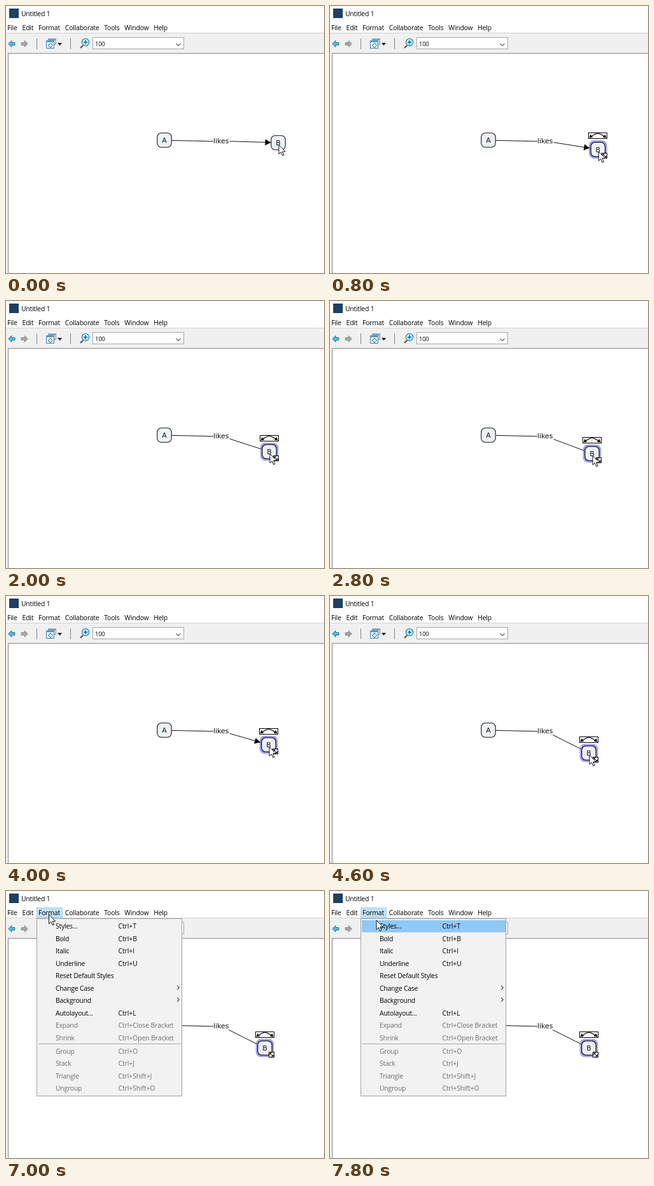
An HTML page with a canvas for the animation above (8 s loop, 500 by 420 pixels).

```html
<!DOCTYPE html>
<html lang="en">
<head>
<meta charset="utf-8">
<title>Concept map editor</title>
<style>
html, body { margin: 0; width: 100%; height: 100%; overflow: hidden; background: #fff; }
canvas { display: block; width: 500px; height: 420px; }
</style>
</head>
<body>
<canvas id="stage" width="500" height="420"></canvas>
<script>
const ctx = document.getElementById('stage').getContext('2d');
const LOOP = 8000, STEP = 200;
const UI = '"Open Sans", "Noto Sans", sans-serif';
const MAP = '"DejaVu Sans", sans-serif';
const A = { x: 249, y: 211 }, LABEL = { x: 338.2, y: 212.4 };
const FLAT_LIMIT = 237; // below this height the link has no arrowhead
const RELEASE = 5400;   // the pointer lets go of the node
const HOVER = 6600, OPEN = 7000;

const drag = [
  { from: 0, to: 1200, x: 418, y: 231 },
  { from: 1200, to: 2400, x: 412, y: 240 },
  { from: 2800, to: 3000, x: 413.5, y: 243 },
  { from: 3200, to: 4000, x: 413, y: 234 },
  { from: 4000, to: 4600, x: 407, y: 247 }
];
const leave = [
  { from: RELEASE, to: 6000, x: 150, y: 171 },
  { from: 6000, to: HOVER, x: 67.5, y: 37 },
  { from: OPEN, to: 7600, x: 73, y: 46 }
];

const menuItems = [
  ['Styles...', 'Ctrl+T'], ['Bold', 'Ctrl+B'], ['Italic', 'Ctrl+I'], ['Underline', 'Ctrl+U'],
  ['Reset Default Styles'], ['Change Case', '>'], ['Background', '>'], ['Autolayout...', 'Ctrl+L'],
  ['Expand', 'Ctrl+Close Bracket'], ['Shrink', 'Ctrl+Open Bracket'], ['Group', 'Ctrl+O'],
  ['Stack', 'Ctrl+J'], ['Triangle', 'Ctrl+Shift+J'], ['Ungroup', 'Ctrl+Shift+O']
];

// Run through straight moves, resting between them
function follow(start, moves, t) {
  return moves.reduce((p, m) => {
    const f = Math.min(1, Math.max(0, (t - m.from) / (m.to - m.from)));
    return { x: p.x + (m.x - p.x) * f, y: p.y + (m.y - p.y) * f };
  }, start);
}

const nodeAt = t => follow({ x: 428, y: 215 }, drag, t);

function pointerAt(t) {
  const b = nodeAt(t);
  return follow({ x: b.x + 1, y: b.y + 3.4 }, leave, t);
}

function rect(x, y, w, h, fill, stroke) {
  if (fill) { ctx.fillStyle = fill; ctx.fillRect(x, y, w, h); }
  if (stroke) {
    ctx.strokeStyle = stroke; ctx.lineWidth = 1;
    ctx.strokeRect(x + 0.5, y + 0.5, w - 1, h - 1);
  }
}

function path(points, { fill, stroke, width = 1 }) {
  ctx.beginPath();
  points.forEach(([x, y]) => ctx.lineTo(x, y));
  if (fill) { ctx.closePath(); ctx.fillStyle = fill; ctx.fill(); }
  if (stroke) { ctx.strokeStyle = stroke; ctx.lineWidth = width; ctx.stroke(); }
}

function shifted(x, y, draw, angle = 0, flip = 1) {
  ctx.save();
  ctx.translate(x, y);
  ctx.rotate(angle);
  ctx.scale(flip, 1);
  draw();
  ctx.restore();
}

// Arrowhead with its tip at x, y
function head(x, y, angle, length, half) {
  shifted(x, y, () => path([[0, 0], [-length, -half], [-length, half]], { fill: '#000' }), angle);
}

// Small v mark, turned by the angle
function chevron(x, y, size, angle) {
  shifted(x, y, () => path([[-size, -size / 2], [0, size / 2], [size, -size / 2]],
    { stroke: '#444', width: 1.1 }), angle);
}

// Returns the width of the text
function text(s, x, y, color = '#000', size = 10.4, spacing = -0.2) {
  ctx.font = `${size}px ${UI}`;
  ctx.letterSpacing = spacing + 'px';
  ctx.textAlign = 'left';
  ctx.fillStyle = color;
  ctx.fillText(s, x, y);
  return ctx.measureText(s).width;
}

function mapText(s, { x, y }) {
  ctx.font = `11px ${MAP}`;
  ctx.letterSpacing = '0px';
  ctx.textAlign = 'center';
  ctx.fillStyle = '#111';
  ctx.fillText(s, x, y + 4);
}

function navArrow(x, dir, fill, stroke) {
  shifted(x, 59.5, () => path(
    [[-5, 0], [0, -5], [0, -2], [5, -2], [5, 2], [0, 2], [0, 5]], { fill, stroke }), 0, dir);
}

function windowsIcon(x, y) {
  rect(x + 3, y, 13, 10, '#ead9c5', '#a58c78');
  rect(x + 3, y, 13, 3, '#7fa3c2');
  rect(x, y + 3, 13, 13, '#eaf5fc', '#4b80a8');
  rect(x, y + 3, 13, 3, '#5b97c2');
  shifted(x + 7, y + 11, () => rect(-3, -3, 6, 6, '#fff', '#2b86c0'), Math.PI / 4);
}

function zoomIcon(x, y) {
  path([[x - 4, y + 5], [x - 8, y + 9]], { stroke: '#6b5348', width: 2.4 });
  ctx.beginPath();
  ctx.arc(x, y, 5.6, 0, 7);
  ctx.fillStyle = '#c9ecfa'; ctx.fill();
  ctx.strokeStyle = '#2587bd'; ctx.lineWidth = 1.3; ctx.stroke();
  path([[x - 3, y], [x + 3, y]], { stroke: '#146fa6', width: 1.6 });
  path([[x, y - 3], [x, y + 3]], { stroke: '#146fa6', width: 1.6 });
}

function toolbar() {
  rect(0, 42, 500, 33, '#f0f0f0');
  rect(0, 42, 500, 1, '#d2d2d2');
  navArrow(8.8, 1, '#55bfe0', '#1b6f9c');
  navArrow(29.2, -1, '#a6a6a6', '#8c8c8c');
  for (const x of [48, 101]) rect(x, 51, 1, 17, '#858585');
  windowsIcon(63, 51);
  head(84.5, 62, Math.PI / 2, 4, 3.5);
  zoomIcon(125, 57);
  rect(136, 49, 144, 19, '#fff', '#a6a6a6');
  text('100', 140, 63, '#000', 9.4);
  chevron(271, 60.8, 3.5, 0);
}

function windowFrame(hover) {
  rect(0, 0, 500, 420, '#fff');
  rect(5, 4, 15, 15, '#1f3f63');
  text('Untitled 1', 24, 16);
  if (hover) rect(48, 26, 41, 16, '#c3e2f6', '#a2d0f0');
  let x = 2;
  for (const name of ['File', 'Edit', 'Format', 'Collaborate', 'Tools', 'Window', 'Help']) {
    x += text(name, x, 38) + 7.9;
  }
  toolbar();
  rect(0, 75, 3, 345, '#f0f0f0');
  rect(3, 74, 497, 1, '#8a8a8a');
  rect(3, 74, 1, 346, '#8a8a8a');
}

function node(p, name, selected) {
  const box = (r, corner, fill) => {
    ctx.beginPath();
    ctx.roundRect(p.x - r, p.y - r, 2 * r, 2 * r, corner);
    ctx.fillStyle = fill; ctx.fill();
  };
  if (selected) box(14.3, 8, '#a0a0f0');
  box(11.2, 6.5, selected ? '#eef1f8' : '#edf2f4');
  ctx.strokeStyle = '#161616';
  ctx.lineWidth = selected ? 1.3 : 1.1;
  ctx.stroke();
  mapText(name, p);
}

// Point where a ray from the centre of a box leaves it
function edge(from, to, halfW, halfH) {
  const dx = to.x - from.x, dy = to.y - from.y;
  const f = Math.min(halfW / Math.abs(dx), halfH / Math.abs(dy));
  return [from.x + dx * f, from.y + dy * f];
}

function link(b, selected) {
  path([[261, 211.4], [326, 212.9]], { stroke: '#111' });
  mapText('likes', LABEL);
  const r = selected ? 13 : 11.5;
  const tip = edge(b, LABEL, r, r);
  path([edge(LABEL, b, 13.5, 6), tip], { stroke: '#111' });
  if (b.y < FLAT_LIMIT) head(...tip, Math.atan2(b.y - LABEL.y, b.x - LABEL.x), 9, 4.8);
}

function handles(b) {
  const x = Math.floor(b.x), y = Math.floor(b.y);
  rect(x - 15, y - 26, 30, 10, '#fff', '#000');
  for (const side of [-1, 1]) {
    shifted(x, y, () => {
      path([[0, -25], [5, -23], [11, -19.5]], { stroke: '#000', width: 1.3 });
      head(13.5, -17.5, 0.7, 5, 3);
    }, 0, side);
  }
  rect(x + 6, y + 6, 9, 9, '#fff', '#000');
  path([[x + 8, y + 8], [x + 13, y + 13]], { stroke: '#000' });
  head(x + 7.5, y + 7.5, -Math.PI * 3 / 4, 2.5, 2.5);
  head(x + 13.5, y + 13.5, Math.PI / 4, 2.5, 2.5);
}

function formatMenu(active) {
  rect(48, 43, 229, 280, '#f2f2f2', '#a0a0a0');
  if (active) rect(50, 46, 226, 19, '#90c8f6');
  rect(51, 240, 224, 1, '#a8a8a8');
  menuItems.forEach(([name, key = ''], i) => {
    const y = Math.round(59 + i * 19.5 + (i > 9 ? 1.5 : 0));
    const color = i > 7 ? '#6d6d6d' : '#000';
    text(name, 78, y, color);
    if (key === '>') chevron(270.7, y - 5, 3, -Math.PI / 2);
    else text(key, 176.5, y, color, 10.4, -0.08);
  });
}

function cursor({ x, y }) {
  shifted(x, y, () => path(
    [[0, 0], [0, 14.5], [3.4, 11.4], [5.8, 17], [8, 16], [5.7, 10.6], [10.3, 10.6]],
    { fill: '#fff', stroke: '#111' }));
}

function draw(t) {
  const b = nodeAt(t), pointer = pointerAt(t);
  const selected = t > 0;
  windowFrame(t >= HOVER);
  node(A, 'A', false);
  node(b, 'B', selected);
  link(b, selected);
  if (selected) handles(b);
  if (t >= OPEN) formatMenu(pointer.y >= 45);
  cursor(pointer);
}

function tick(now) {
  draw(Math.floor(now % LOOP / STEP) * STEP);
  requestAnimationFrame(tick);
}
draw(0);
requestAnimationFrame(tick);
</script>
</body>
</html>
```
